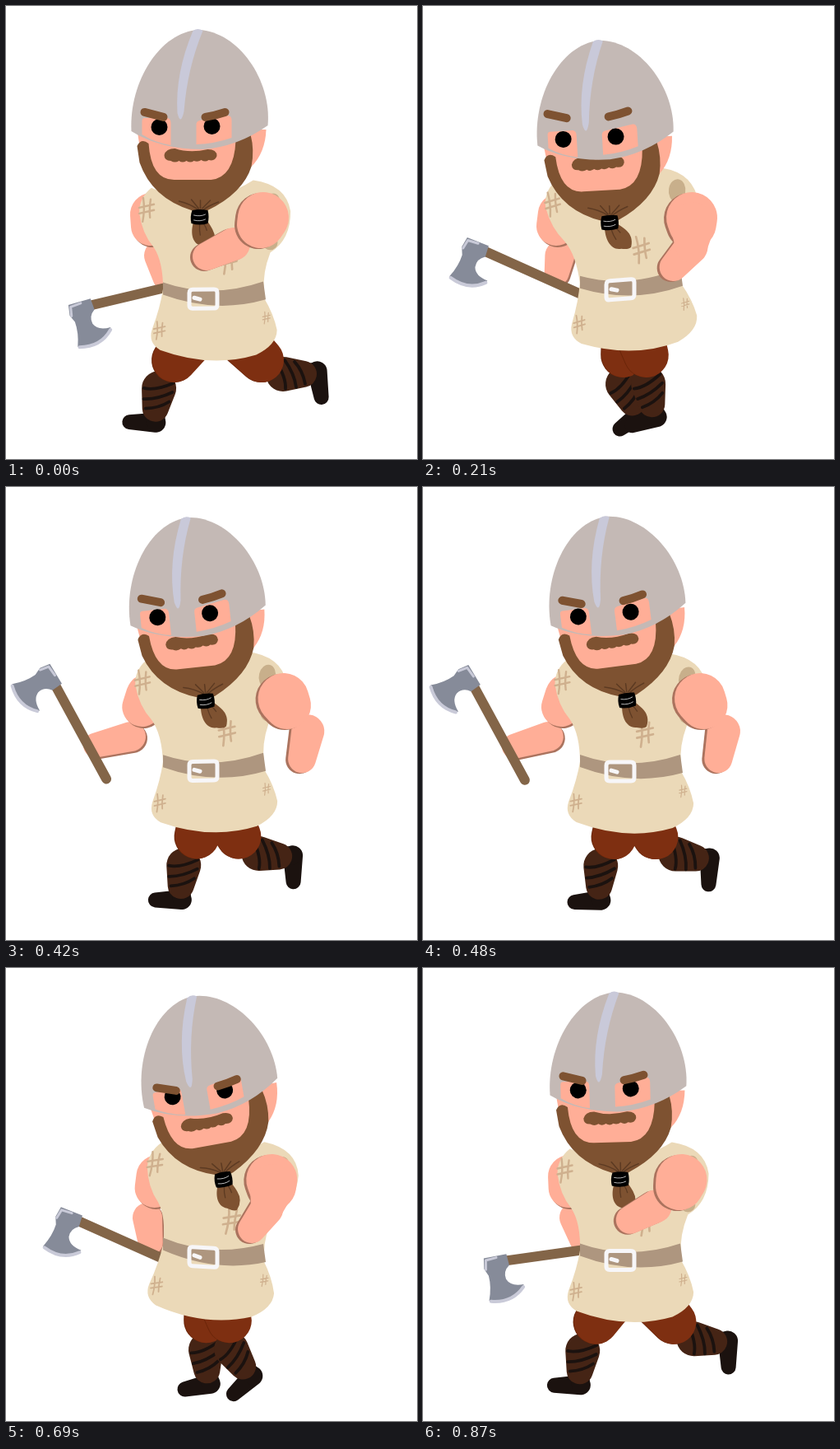
An HTML page with a canvas that plays this animation: 500x550 px, repeating every 0.9 s.

```html
<!DOCTYPE html>
<html lang="en">
<head>
<meta charset="utf-8">
<title>Running axeman</title>
<style>
html, body { margin: 0; width: 100%; height: 100%; overflow: hidden; background: #fff; }
canvas { display: block; width: 500px; height: 550px; }
</style>
</head>
<body>
<canvas id="stage" width="500" height="550"></canvas>
<script>
const ctx = document.getElementById('stage').getContext('2d');
const LOOP = 900, STEP = 30;
const C = {
  skin: '#ffae97', shade: '#ab735e', tunic: '#ebd9b8', fold: '#c8af8b', stitch: '#cfb08e',
  belt: '#ae967f', buckle: '#f7f6f8', steel: '#c4b9b5', shine: '#c9c9d9', hair: '#7e5231',
  strand: '#5c3a22', trousers: '#7e2f11', seam: '#6a2509', boot: '#452415', shoe: '#1b120f',
  blade: '#868b99', edge: '#c9cad8', wood: '#836548', ink: '#000'
};

// Triangle wave: 1 at the start of a loop, -1 halfway
const tri = ms => 4 * Math.abs((ms / LOOP + 1) % 1 - .5) - 1;
const rad = deg => deg * Math.PI / 180;

const shapes = {};
const path = d => shapes[d] || (shapes[d] = new Path2D(d));
function fill(color, d) {
  ctx.fillStyle = color;
  ctx.fill(path(d));
}
function stroke(color, width, d) {
  ctx.strokeStyle = color;
  ctx.lineWidth = width;
  ctx.stroke(path(d));
}
function oval(color, x, y, rx, ry, rot = 0) {
  ctx.fillStyle = color;
  ctx.beginPath();
  ctx.ellipse(x, y, rx, ry, rot, 0, 2 * Math.PI);
  ctx.fill();
}
function group(draw) {
  ctx.save();
  draw();
  ctx.restore();
}
function pivot(x, y, deg) {
  ctx.translate(x, y);
  ctx.rotate(rad(deg));
}

// Tapered capsule
function limb(color, x1, y1, r1, x2, y2, r2) {
  const a = Math.atan2(y2 - y1, x2 - x1);
  const k = (r1 - r2) / (Math.hypot(x2 - x1, y2 - y1) || 1);
  const b = Math.acos(Math.max(-1, Math.min(1, k)));
  ctx.fillStyle = color;
  ctx.beginPath();
  ctx.arc(x1, y1, r1, a + b, a - b + 2 * Math.PI);
  ctx.arc(x2, y2, r2, a - b, a + b);
  ctx.fill();
}

// Both legs share one gait, half a loop apart; angles run from straight down
function leg(hip, pace, sway, rise) {
  const lift = Math.abs(pace);
  const thigh = rad(14 * lift - 43 * pace);
  const bend = 17 - 50 * pace + 23 * lift + 13 * sway;
  const shin = rad(bend), ankle = rad(bend + 12), sole = rad(bend + 9);
  const kx = hip - 42 * pace, ky = 430 + rise * .5;
  const reach = 35 + 4 * pace;
  const tx = kx + reach * Math.sin(thigh), ty = ky + reach * Math.cos(thigh);
  const ax = tx + 25 * Math.sin(shin), ay = ty + 25 * Math.cos(shin);
  const hx = ax + 17 * Math.sin(ankle), hy = ay + 17 * Math.cos(ankle);

  limb(C.shoe, hx, hy, 12, hx - 32 * Math.cos(sole), hy + 32 * Math.sin(sole), 9);
  limb(C.shoe, ax, ay, 12, hx, hy, 11);
  limb(C.boot, tx, ty, 21, ax, ay, 16);
  group(() => {
    pivot(tx, ty, -bend);
    stroke(C.shoe, 3.8, 'M-18 3Q-4 4 16-9M-16 16Q0 14 17 2M-12 27Q4 24 15 14');
  });
  const hipX = (kx + 252) / 2;
  limb(C.seam, hipX - 1, ky - 30, 30, kx - 1, ky, 27);
  limb(C.trousers, hipX, ky - 30, 30, kx, ky, 27);
}

function arm([sx, sy, ux, uy, ex, ey, hx, hy], upper, fore, dx, dy) {
  const parts = [
    [sx, sy, upper, ux, uy, upper - 2],
    [ex, ey, fore, hx, hy, fore - 3]
  ];
  const shadow = ([x1, y1, r1, x2, y2, r2]) => limb(C.shade, x1 + dx, y1 + dy, r1, x2 + dx, y2 + dy, r2);
  const flesh = p => limb(C.skin, ...p);
  if (Math.hypot(ux - ex, uy - ey) > 34) {
    parts.reverse().forEach(p => { shadow(p); flesh(p); });
  } else {
    parts.forEach(shadow);
    parts.forEach(flesh);
    limb(C.skin, ux, uy, upper - 4, ex, ey, fore - 1);
  }
}

function nearArm(pace, sway) {
  arm([
    326 - 13 * pace + 2 * sway, 257,
    327 - 17 * pace + 2 * sway, 265,
    325 - 48 * pace + 5 * sway, 293 - 4 * pace,
    306 - 62 * pace + 3 * sway, 318 - 14 * pace
  ], 31, 20, -3, 1);
}

// The far hand holds the axe near the end of its handle
function farArmAndAxe(pace, sway) {
  const x = 82 + 23 * pace - 7 * sway;
  const y = 299 + 64 * pace - 5 * sway;
  const angle = 24 - 40 * pace;
  const shoulder = 175 + 2 * pace - 10 * sway;
  arm([
    shoulder, 253,
    shoulder - 4 + 3 * pace, 267,
    168 + 18 * pace - 3 * sway, 303,
    x + 92 * Math.cos(rad(angle)), y + 92 * Math.sin(rad(angle)) - 8
  ], 26, 18, 2, 2);
  group(() => {
    pivot(x, y, angle);
    stroke(C.wood, 12, 'M0 0L127 6');
    fill(C.blade, 'M-28-8L0-8L1 6Q-8 12-6 22Q-2 32 14 32Q8 46-12 48Q-24 49-31 44Q-25 28-26 14L-30 5Z');
    stroke(C.edge, 4, 'M-29 45Q-4 52 13 35');
    stroke(C.edge, 3, 'M-28 6L-26-5L-13-6');
  });
}

function hash(x, y, s) {
  group(() => {
    ctx.translate(x, y);
    ctx.scale(s, s);
    stroke(C.stitch, 2.4, 'M-4-14Q-2 0-5 15M5-12Q3 0 4 10M-9-2L9-6M-9 5L9 1');
  });
}

// Chest and skirt lean apart around a fixed waist
function torso(pace, sway, rise) {
  const bend = (skew, draw) => group(() => {
    ctx.translate(252, 345 + rise);
    ctx.transform(1, -.01 - .075 * sway, skew, 1, 0, 0);
    ctx.translate(-252, -345);
    draw();
  });
  bend((5.5 * sway - .5) / 70, () => {
    fill(C.tunic, 'M191 343Q188 365 178 392Q173 408 188 417Q250 440 305 424Q330 412 330 394Q326 375 314 355V343Z');
    hash(187, 393, .75);
    hash(317, 379, .5);
  });
  bend((3 + 14 * sway - 2 * pace) / 110, () => {
    fill(C.tunic, 'M178 220Q163 232 163 250Q166 275 180 292Q192 310 191 346H314Q312 325 322 300Q347 285 347 250Q342 218 302 212Q240 250 178 220Z');
    oval(C.fold, 324, 242, 10, 14, .3);
    oval(C.fold, 322, 288, 9, 9);
    hash(172, 246, 1);
    hash(271, 309, 1.1);
  });
  bend(0, () => {
    fill(C.belt, 'M191 335Q250 356 313 335L316 357Q255 374 191 350Z');
    stroke(C.buckle, 5, 'M227 344H253Q257 344 257 348V363Q257 367 253 367H227Q223 367 223 363V348Q223 344 227 344ZM229 354L236 356');
  });
}

function head(pace, sway, bob) {
  const x = 235.5 - 14.5 * sway;
  const y = 156.5 - 3.2 * pace + 5 * sway - 5.3 * bob;
  const tilt = -7.3 + 3.3 * pace + 3.6 * sway + 4 * bob;
  const brow = -4.5 + 2.2 * pace - 10 * sway + 2.2 * bob;
  const look = -1 - 2.5 * sway;
  group(() => {
    pivot(x, y, tilt);
    ctx.translate(-236, -148);
    fill(C.skin, 'M160 150H317Q316 178 299 195L260 220H200Q170 205 163 170Z');
    fill(C.hair, 'M160 170Q165 160 174 167Q177 211 205 211H250Q278 208 280 163L298 156Q303 175 299 195Q289 227 246 248Q236 252 226 248Q178 233 163 190Z');

    // The knot of the beard stays higher as the head drops
    group(() => {
      ctx.translate(tilt * .35, (148 - y) * .45);
      group(() => {
        pivot(236, 260, -18 + 6 * pace - 14 * sway);
        fill(C.hair, 'M-6-2C-14 10-16 26-4 31Q3 37 7 36Q17 27 13 14Q10 4 6-2Z');
        stroke(C.strand, 1.3, 'M-1 5Q-3 12-3 18M4 5Q6 10 6 14');
      });
      stroke(C.strand, 1.5, 'M234 247Q224 240 211 237M235 246L226 235M237 246V236M239 246L249 236M241 247Q248 242 259 238');
      fill(C.ink, 'M227 248Q236 246 246 248Q248 256 246 264Q236 267 226 264Q224 256 227 248Z');
      stroke('#ddd', .8, 'M229 254Q237 256 243 253M229 260Q237 262 243 259');
    });
    group(() => {
      ctx.translate(0, brow * .25);
      fill(C.hair, 'M193 181Q195 173 206 173Q224 179 246 174Q257 174 257 182Q255 189 247 187Q243 190 238 187Q234 190 229 188Q225 191 220 188Q215 191 211 188Q206 191 201 188Q193 188 193 181Z');
    });
    fill(C.steel, 'M153 152C150 92 188 31 235 29C283 31 324 90 319 145Q282 171 240 174Q188 174 153 152Z');
    fill(C.shine, 'M228 30Q234 26 240 30Q221 76 217 128Q213 146 209 130Q206 82 228 30Z');
    fill(C.skin, 'M169 136H197Q201 137 201 142V169Q182 166 166 156V140Q166 136 169 136Z');
    fill(C.skin, 'M236 139L270 133Q275 133 275 139V160Q255 167 232 168V144Q232 140 236 139Z');

    // The face keeps a little more level than the helmet
    group(() => {
      pivot(220 + look, 147, tilt * -.4);
      oval(C.ink, -32, 0, 10, 10);
      oval(C.ink, 32, -1, 10, 10);
      ctx.translate(0, brow);
      stroke(C.hair, 10, 'M-50-18L-27-12M24-12Q36-14 48-18');
    });
  });
}

function frame(now) {
  const t = Math.floor(now % LOOP / STEP) * STEP;
  const pace = tri(t), sway = tri(t - LOOP / 4), bob = Math.abs(pace);
  const rise = -8.5 + 5.4 * pace - 4.5 * sway + 3.1 * bob;
  ctx.fillStyle = '#fff';
  ctx.fillRect(0, 0, 500, 550);
  leg(247, pace, sway, rise);
  leg(269, -pace, -sway, rise);
  farArmAndAxe(pace, sway);
  torso(pace, sway, rise);
  head(pace, sway, bob);
  nearArm(pace, sway);
}

ctx.lineCap = ctx.lineJoin = 'round';
const start = performance.now();
function tick() {
  frame(performance.now() - start);
  requestAnimationFrame(tick);
}
tick();
</script>
</body>
</html>
```
